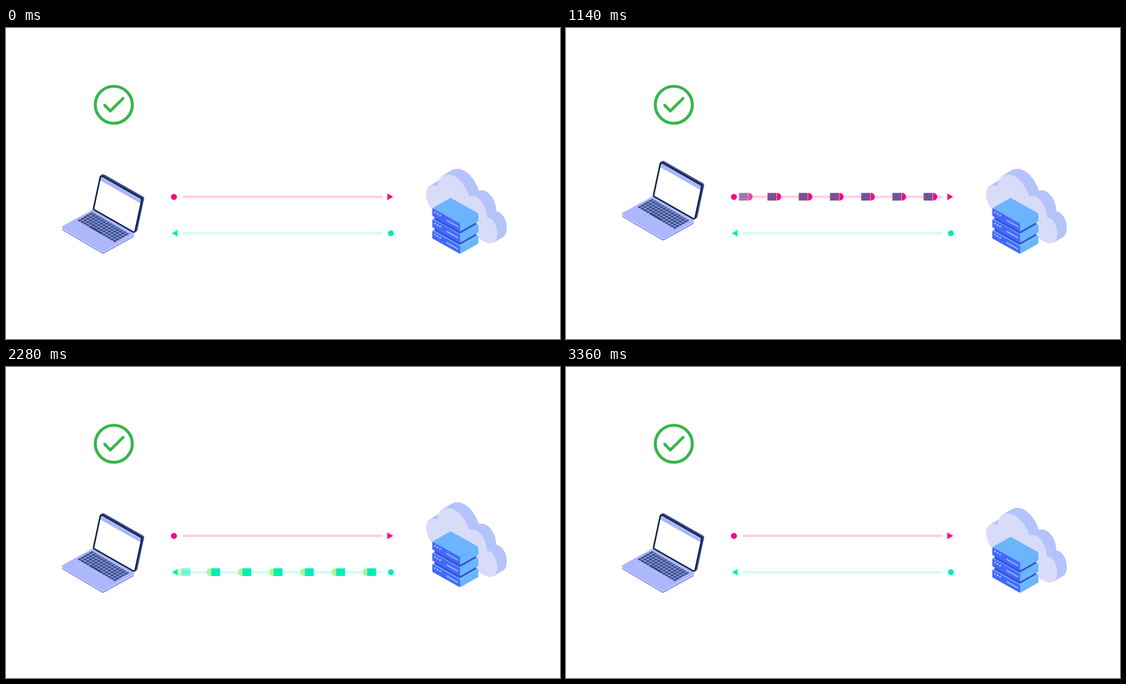
An HTML page with a canvas for the animation above (3.59 s loop, 998x561 px).

```html
<!DOCTYPE html>
<html lang="en">
<head>
<meta charset="utf-8">
<title>Client and cloud</title>
<style>
html, body { margin: 0; width: 100%; height: 100%; overflow: hidden; background: #fff; }
canvas { display: block; }
</style>
</head>
<body>
<canvas id="stage" width="998" height="561"></canvas>
<script>
const ctx = document.getElementById('stage').getContext('2d');

const LOOP = 3590, STEP = 30, LAST_CHANGE = 3360;
const PACKETS = 8, PACKET_GAP = 150, REPLY_START = 1230;
const START_SPEED = 0.12, SPEED = 0.375, EASE_IN = 170;
const FADE_IN = 120, FADE_OUT = 1020, LIFE = 1080;
const HOP_PERIOD = 480, HOP_TIME = 360, HOPS = 3;
const PINK = '#ff0084', TEAL = '#00edb7';

const add = (p, q, k = 1) => [p[0] + q[0] * k, p[1] + q[1] * k];
const mul = (p, k) => [p[0] * k, p[1] * k];

// Parallelogram with corner o and sides u, v, its corners rounded by r.
function quad(color, o, u, v, r = 0) {
  const corners = [o, add(o, u), add(add(o, u), v), add(o, v)];
  ctx.beginPath();
  ctx.moveTo(...add(o, u, 0.5));
  for (let i = 1; i <= 4; i++) ctx.arcTo(...corners[i % 4], ...corners[(i + 1) % 4], r);
  ctx.closePath();
  ctx.fillStyle = color;
  ctx.fill();
}

// The part of the parallelogram o, u, v from (x, y) of size w by h, in fractions.
function part(color, [o, u, v], x, y, w, h, r) {
  quad(color, add(add(o, u, x), v, y), mul(u, w), mul(v, h), r);
}

function line(color, width, ...points) {
  ctx.beginPath();
  points.forEach(p => ctx.lineTo(...p));
  ctx.strokeStyle = color;
  ctx.lineWidth = width;
  ctx.lineCap = ctx.lineJoin = 'round';
  ctx.stroke();
}

function dot(color, x, y, r) {
  ctx.beginPath();
  ctx.arc(x, y, r, 0, Math.PI * 2);
  ctx.fillStyle = color;
  ctx.fill();
}

function shifted(dx, dy, draw) {
  ctx.save();
  ctx.translate(dx, dy);
  draw();
  ctx.restore();
}

function drawCheck() {
  ctx.beginPath();
  ctx.arc(194.2, 138.5, 33.4, 0, Math.PI * 2);
  ctx.strokeStyle = '#39b54a';
  ctx.lineWidth = 5.4;
  ctx.stroke();
  line('#39b54a', 5.2, [177.8, 139.3], [187.8, 149.8], [210.8, 127]);
}

function drawKeys() {
  const board = [[155, 332], [68, 40], [-27, 15.5]];
  const rows = 6, cols = 14, spaceAt = 4, spaceSpan = 5;
  for (let row = 0; row < rows; row++) {
    const top = row && (row - 0.45) / (rows - 0.45);
    const height = row ? 0.145 : 0.075;
    for (let col = 0; col < cols;) {
      const span = row === rows - 1 && col === spaceAt ? spaceSpan : 1;
      part('#34497f', board, col / cols, top, span / cols - 0.013, height);
      col += span;
    }
  }
}

function drawLaptop() {
  const base = [[157, 327], [76.5, 45], [-59, 32.5]];
  shifted(0, 3.2, () => quad('#7289f6', ...base, 3));
  shifted(0, 1, () => quad('#eef0ff', ...base, 3));
  quad('#acb7fc', ...base, 3);
  drawKeys();

  const lid = [[169.6, 263.3], [77.2, 44], [-13.8, 64.4]];
  shifted(2.6, -1.8, () => quad('#3a4f86', ...lid, 4));
  quad('#15254c', ...lid, 4);
  part('#abb6fb', lid, 0.035, 0.045, 0.93, 0.91, 2);
  part('#fff', lid, 0.035, 0.16, 0.93, 0.795, 1);
}

function fillCloud(color) {
  ctx.beginPath();
  ctx.moveTo(757, 300);
  ctx.bezierCurveTo(757, 286, 766, 279, 777.5, 286);
  ctx.bezierCurveTo(777, 254, 818, 255, 835, 304);
  ctx.bezierCurveTo(848, 298, 866, 317, 866, 341);
  ctx.bezierCurveTo(878, 343, 885, 357, 885, 371);
  ctx.bezierCurveTo(885, 387, 876, 392, 862, 386);
  ctx.lineTo(775, 334);
  ctx.bezierCurveTo(765, 327, 757, 314, 757, 300);
  ctx.fillStyle = color;
  ctx.fill();
}

// Isometric slab of the rack's footprint, pulled in by a fraction on every side.
function drawSlab(height, inset, left, right, top, r) {
  const depth = [33, -18.8], width = [50, 28.2], down = [0, height];
  const corner = add(add([768, 325], depth, inset), width, inset);
  const u = mul(width, 1 - 2 * inset), v = mul(depth, 1 - 2 * inset);
  quad(top, corner, u, v, r);
  quad(left, corner, u, down, r);
  quad(right, add(corner, u), v, down, r);
}

function drawUnit() {
  drawSlab(14, 0, '#4568fd', '#6ab5fd', '#6cb4fe', 1);
  for (let i = 0; i < 3; i++) dot('#a9cdff', 772.8 + i * 4.6, 332.6 + i * 2.7, 1.6);
  quad('#78b2ff', [793.3, 344.8], [21.5, 12.2], [0, 3.2], 1);
}

function drawCloud() {
  const slices = 24;
  for (let i = slices; i >= 0; i--) {
    const k = i / slices;
    shifted(17.2 * k, -10.2 * k, () => fillCloud(i ? '#b4c3fb' : '#d9dcf8'));
  }
  for (let i = 2; i >= 0; i--) {
    shifted(0, i * 20.2, drawUnit);
    if (i) shifted(0, i * 20.2 - 7, () => drawSlab(7, 0.05, '#3553dc', '#3350cf', '#3350cf', 0));
  }
}

function packetOffset(age) {
  const ramp = Math.min(age, EASE_IN);
  const cruise = Math.max(0, Math.min(age, FADE_OUT) - EASE_IN);
  const rest = Math.max(0, age - FADE_OUT), brake = LIFE - FADE_OUT;
  return START_SPEED * ramp + (SPEED - START_SPEED) * ramp * ramp / (2 * EASE_IN)
    + SPEED * (cruise + rest - rest * rest / (2 * brake));
}

function packetAlpha(age) {
  return Math.min(1, age / FADE_IN, (LIFE - age) / (LIFE - FADE_OUT));
}

// Drawn from its rear edge; dir is 1 to the right and -1 to the left.
function drawPacket(x, y, dir, body, head, seam) {
  const half = 6.9, length = 16.2;
  ctx.save();
  ctx.translate(x, y);
  ctx.scale(dir, 1);
  ctx.fillStyle = body;
  ctx.fillRect(0, -half, length, half * 2);
  ctx.beginPath();
  ctx.moveTo(length + seam, -half);
  ctx.arc(length + 1.4, 0, half, -Math.PI / 2, Math.PI / 2);
  ctx.lineTo(length + seam, half);
  ctx.fillStyle = head;
  ctx.fill();
  ctx.restore();
}

function drawPackets(time, startX, y, dir, ...look) {
  for (let k = 0; k < PACKETS; k++) {
    const age = time - k * PACKET_GAP;
    if (age <= 0 || age >= LIFE) continue;
    ctx.globalAlpha = packetAlpha(age);
    drawPacket(startX + dir * packetOffset(age), y, dir, ...look);
  }
  ctx.globalAlpha = 1;
}

function drawArrow(color, x, y, dir) {
  ctx.beginPath();
  ctx.moveTo(x, y - 6);
  ctx.lineTo(x + dir * 10.3, y);
  ctx.lineTo(x, y + 6);
  ctx.fillStyle = color;
  ctx.fill();
}

function hop(time, height) {
  if (time < 0 || time >= HOPS * HOP_PERIOD) return 0;
  const half = HOP_TIME / 2;
  return -height * Math.max(0, 1 - Math.abs(time % HOP_PERIOD - half) / half);
}

function render(t) {
  const reply = t - REPLY_START;
  ctx.fillStyle = '#fff';
  ctx.fillRect(0, 0, 998, 561);
  drawCheck();
  shifted(0, hop(t, 24), drawLaptop);
  shifted(0, hop(reply, 20), drawCloud);

  line('#ffcfe3', 4.6, [320, 304.5], [676.7, 304.5]);
  line('#d2fbf2', 4.6, [319.3, 370.2], [676, 370.2]);
  drawPackets(t, 294.7, 304.4, 1, '#7a5095', PINK, 0.7);
  drawPackets(reply, 701.5, 370.1, -1, TEAL, '#acf993', 0);

  dot(PINK, 302.5, 304.6, 5.4);
  drawArrow(PINK, 687, 304.6, 1);
  dot(TEAL, 693.4, 370.2, 5.4);
  drawArrow(TEAL, 309.2, 370.2, -1);
}

const start = performance.now();
function frame() {
  const t = (performance.now() - start) % LOOP;
  render(Math.min(Math.floor(t / STEP) * STEP, LAST_CHANGE));
  requestAnimationFrame(frame);
}
frame();
</script>
</body>
</html>
```
